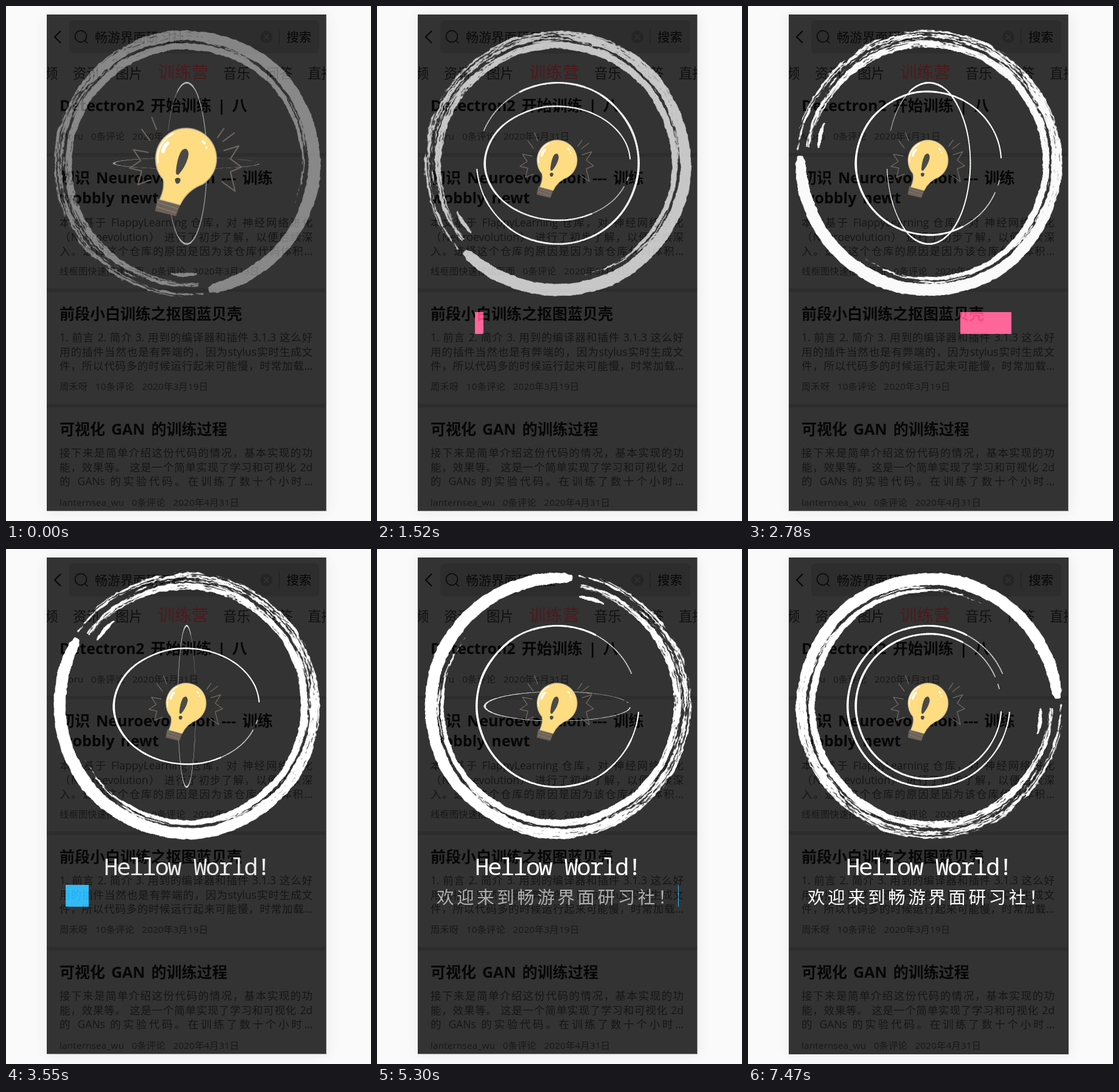
An HTML page with a canvas that plays this animation: 600 px wide and 848 px high, repeating every 8000 ms.

```html
<!DOCTYPE html>
<html lang="zh-CN">
<head>
<meta charset="utf-8">
<title>Intro</title>
<style>
html, body { margin: 0; width: 100%; height: 100%; overflow: hidden; background: #fafafa; }
body { position: relative; }
#card { position: absolute; left: 67px; top: 14px; width: 459px; height: 817px; overflow: hidden;
  background: #333; border: solid #969696; border-width: 0 1px 1px 0; box-shadow: 0 0 22px rgba(0,0,0,.07); }
#page { position: absolute; left: -67px; top: -14px; width: 600px; height: 848px;
  font-family: "Open Sans", "Noto Sans CJK SC", "Noto Sans CJK", sans-serif; }
#page div, #page svg { position: absolute; }
.t { white-space: nowrap; line-height: 30px; height: 30px; }
.title { font-weight: 700; word-spacing: 3.5px; }
.body { width: 416px; text-align: justify; text-align-last: justify; }
.meta { display: flex; gap: 12.5px; letter-spacing: .2px; }
.bar { left: 67px; width: 460px; height: 6px; background: #2d2d2d; }
#art { position: absolute; left: 0; top: 0; }
.line { position: absolute; height: 36px; color: #fff; white-space: nowrap; }
.line i { position: absolute; top: 0; height: 100%; mix-blend-mode: screen; }
.line span { display: block; opacity: 0; }
#hello { left: 161px; top: 504px; width: 272px; letter-spacing: -2.48px;
  font: 39px/36px "Noto Sans Mono", "Liberation Mono", monospace; }
#hello i { background: #ff4081; }
#welcome { left: 98px; top: 553px; width: 397px; letter-spacing: 4.58px;
  font: 500 28.5px/37px "Noto Sans CJK SC", "Noto Sans CJK", sans-serif; }
#welcome i { background: #03a9f4; }
</style>
</head>
<body>
<div id="card"><div id="page">
  <svg width="600" height="140" fill="none" stroke="#080808" stroke-width="2">
    <rect x="104" y="24" width="411" height="54" rx="6" fill="#2d2d2d" stroke="none"/>
    <path d="M90 41 80 51 90 61" stroke-width="2.2"/>
    <circle cx="123" cy="50" r="9.5" stroke-width="1.6"/>
    <path d="M129.500 57 134.500 61.500" stroke-width="1.6"/>
    <circle cx="428" cy="51" r="10" fill="#252525" stroke="none"/>
    <path d="M424 47l8 8m0-8l-8 8" stroke="#333" stroke-width="1.6"/>
    <path d="M449 38v26" stroke="#202020" stroke-width="1"/>
  </svg>
</div></div>
<canvas id="art" width="600" height="848"></canvas>
<div class="line" id="hello"><span>Hellow World!</span><i></i></div>
<div class="line" id="welcome"><span>欢迎来到畅游界面研习社！</span><i></i></div>

<script>
const $ = id => document.getElementById(id);
const card = $('card'), page = $('page'), g = $('art').getContext('2d');

// ---- page behind the veil ----
function put(text, x, base, size, color, cls = '') {
  const d = document.createElement('div');
  d.className = 't ' + cls;
  d.style.cssText = `left:${x}px;top:${base - .388 * size - 15}px;font-size:${size}px;color:${color}`;
  for (const part of [].concat(text)) {
    const s = document.createElement('span');
    s.textContent = part;
    d.append(s);
  }
  page.append(d);
}
function bar(y) {
  const d = document.createElement('div');
  d.className = 'bar';
  d.style.top = y + 'px';
  page.append(d);
}
const title = (s, y) => put(s, 88, y, 25, '#060606', 'title');
const body = (y, ...rows) => rows.forEach((s, i) => put(s, 88, y + i * 23.6, 17.5, '#161616', 'body'));
const meta = (y, ...parts) => put(parts, 88, y, 15.25, '#181818', 'meta');

put('畅游界面研习社', 146, 59, 21, '#0b0b0b');
put('搜索', 461, 59, 20.5, '#060606');
for (const [s, x] of [['频', 63], ['资讯', 110], ['图片', 180], ['音乐', 357], ['问答', 427], ['直播', 496]])
  put(s, x, 120, 22.2, '#101010');
put('训练营', 250, 120, 27.5, '#4c1a1d');

title('Detectron2 开始训练 | 八', 173);
meta(220, 'Moru', '0条评论', '2020年4月31日');
bar(242);
title('初识 Neuroevolution --- 训练', 292);
title('wobbly newt', 325);
body(363, '本文基于 FlappyLearning 仓库，对 神经网络进化',
  '（Neuroevolution） 进行了初步了解，以便后续深',
  '入。选择这个仓库的原因是因为该仓库代码体积…');
meta(442, '线框图快速搭建页面', '0条评论', '2020年3月13日');
bar(465);
title('前段小白训练之抠图蓝贝壳', 516);
body(552, '1. 前言 2. 简介 3. 用到的编译器和插件 3.1.3 这么好',
  '用的插件当然也是有弊端的，因为stylus实时生成文',
  '件，所以代码多的时候运行起来可能慢，时常加载…');
meta(632, '周禾呀', '10条评论', '2020年3月19日');
bar(655);
title('可视化 GAN 的训练过程', 706);
body(742, '接下来是简单介绍这份代码的情况，基本实现的功',
  '能，效果等。 这是一个简单实现了学习和可视化 2d',
  '的 GANs 的实验代码。在训练了数十个小时…');
meta(823, 'lanternsea_wu', '0条评论', '2020年4月31日');

// ---- helpers ----
const RAD = Math.PI / 180;
const clamp = v => Math.max(0, Math.min(1, v));
const mix = (a, b, k) => a + (b - a) * k;
function hash(x, y) {
  const v = Math.sin(x * 127.1 + y * 311.7) * 43758.5453;
  return v - Math.floor(v);
}
function noise(x, y) {
  const i = Math.floor(x), j = Math.floor(y), u = x - i, v = y - j;
  const a = u * u * (3 - 2 * u), b = v * v * (3 - 2 * v);
  return mix(mix(hash(i, j), hash(i + 1, j), a), mix(hash(i, j + 1), hash(i + 1, j + 1), a), b);
}
// cubic-bezier(.25, .1, .25, 1)
function ease(p) {
  p = clamp(p);
  if (p === 0 || p === 1) return p;
  const curve = (s, a, b) => 3 * (1 - s) ** 2 * s * a + 3 * (1 - s) * s * s * b + s ** 3;
  let lo = 0, hi = 1;
  for (let i = 0; i < 24; i++) {
    const m = (lo + hi) / 2;
    if (curve(m, .25, .25) < p) lo = m; else hi = m;
  }
  return curve(lo, .1, 1);
}

// ---- brush ring: bands of [angle, inner radius, outer radius, ink], clockwise from the head ----
const bands = [
  [[2, 214, 221, .6], [60, 207, 221, .55], [130, 203, 219, .72], [200, 201, 219, .98],
   [290, 198, 220, 1.15], [340, 200, 220, 1.2], [357, 203, 220, 1.25], [360.5, 208, 217, 1.25]],
  [[4, 196, 205, .75], [60, 190, 203, .75], [130, 187, 200, .98], [200, 186, 198, 1.05],
   [260, 187, 195, .95], [302, 188, 192, .4]],
  [[4.500, 182, 186, 1], [11, 180, 188, 1.2], [18.5, 182, 186, .8]],
  [[30, 194, 214, .38], [140, 190, 214, .5], [275, 190, 210, .46]]
];
function ink(band, a, r) {
  const end = band[band.length - 1];
  if (a < band[0][0] || a > end[0]) return 0;
  const i = Math.max(1, band.findIndex(k => k[0] >= a));
  const p = band[i - 1], q = band[i], k = (a - p[0]) / (q[0] - p[0]);
  const lo = mix(p[1], q[1], k), hi = mix(p[2], q[2], k);
  const along = clamp(Math.min(a - band[0][0], end[0] - a) * 1.5);
  return mix(p[3], q[3], k) * clamp((r - lo) / 2.5 + .3) * clamp((hi - r) / 2.5 + .3) * along;
}
function makeRing() {
  const size = 460, c = size / 2, cv = document.createElement('canvas');
  cv.width = cv.height = size;
  const x2 = cv.getContext('2d'), img = x2.createImageData(size, size);
  for (let y = 0; y < size; y++) for (let x = 0; x < size; x++) {
    const dx = x + .5 - c, dy = y + .5 - c, dist = Math.hypot(dx, dy);
    if (dist < 174 || dist > 228) continue;
    let a = Math.atan2(dx, -dy) / RAD;
    if (a < 1) a += 360;
    const r = dist + (noise(a * .06, 3) - .5) * 2 + (noise(a * .6, 8) - .5) * 1.5;
    const n = noise(a * .16, r * .62) * .65 + noise(a * .9, r * .8 + 50) * .35;
    const d = Math.max(...bands.map(b => ink(b, a, r)));
    const p = (y * size + x) * 4;
    img.data[p] = img.data[p + 1] = img.data[p + 2] = 255;
    img.data[p + 3] = 255 * clamp((d - n) * 6);
  }
  x2.putImageData(img, 0, 0);
  return cv;
}
const ring = makeRing();

// thin hand-drawn circle, broken at the upper right
function hoop(r, sx, sy, alpha) {
  g.save();
  g.translate(297, 259);
  g.scale(sx, sy);
  g.strokeStyle = '#fff';
  for (let a = 4; a < 352; a += 2) {
    const dry = a > 296;
    if (dry && noise(a * .16, r) < .34) continue;
    g.globalAlpha = alpha * (dry ? .7 : 1);
    g.lineWidth = dry ? 1.7 : 2 + 1.3 * Math.sin(a * RAD / 2) + noise(a * .15, r) - .5;
    g.beginPath();
    g.arc(0, 0, r - 1.5 + noise(a * .05, r + 9), a * RAD, (a + 2.3) * RAD);
    g.stroke();
  }
  g.restore();
}

const shape = (d, fill) => { g.fillStyle = fill; g.fill(new Path2D(d)); };
const stroke = (d, color, w) => { g.strokeStyle = color; g.lineWidth = w; g.stroke(new Path2D(d)); };
const GLASS = 'M263 254A33 33 0 1 1 314 281.500Q297 288 289.500 304L267.500 298Q273.500 285 271 276Q263 267 263 254Z';
function bulb(s) {
  g.save();
  g.translate(296, 258.5);
  g.scale(s, s);
  g.translate(-296, -258.5);
  g.lineCap = g.lineJoin = 'round';
  stroke('M255 247 239 244 247 256 235 264 248 267 244 282 257 277' +
    'M337 245 353 240 344 254 356 263 344 268 349 289 335 279' +
    'M248 222 257 234M259 209 264 222M330 231 337 221M336 235 348 226', '#6c655f', 1.4);
  shape('M265 297 289.500 304 285 316 262.500 310.500Z', '#6d6259');
  stroke('M265.500 301 286.500 308M264.500 306 285 312.500', '#86796d', 1);
  shape(GLASS, '#fddc82');
  stroke(GLASS, 'rgba(190,180,155,.7)', 1.2);
  stroke('M265.500 258A30.500 30.500 0 0 1 282 226.500', 'rgba(255,250,235,.9)', 2);
  stroke('M271 246Q272 240 276 237', '#fff', 4);
  stroke('M314 235 316 237M318 242h.1', '#fff', 2.5);
  shape('M290 247Q292 243 296 243Q300 246 298 253Q295 263 288 271Q285 272 285 268Q286 255 290 247Z', '#4c4a46');
  shape('M284 276Q287 273 290 276Q290 281 286 281Q284 280 284 276Z', '#4c4a46');
  g.restore();
}

// block grows from the left, leaves to the right, then its text fades in
const HALF = 942;
function reveal(el, t) {
  const grow = ease(t / HALF), leave = ease((t - HALF) / HALF);
  const bar = el.querySelector('i').style;
  bar.left = leave * 100 + '%';
  bar.width = (grow - leave) * 100 + '%';
  el.querySelector('span').style.opacity = ease((t - 1.6 * HALF) / HALF);
}

function draw(t) {
  card.style.borderColor = t < 7470 ? '#969696' : '#333';

  const fade = clamp(.42 + t * .0002);
  const turn = .037 * (t - 7470);
  g.clearRect(0, 0, 600, 848);
  g.save();
  g.globalAlpha = fade;
  g.translate(297.5, 258.5);
  g.rotate((86.5 + turn) * RAD);
  g.drawImage(ring, -230, -230);
  g.restore();

  const spin = Math.min(180, -75.5 + t * .0484);
  const soft = clamp(.62 + t * .0002);
  hoop(134, -Math.cos(spin * RAD), 1, soft);
  hoop(120.5, 1, -Math.cos((182 + turn) * RAD), soft);
  bulb(mix(1.52, 1, 1 - (1 - clamp(t / 900)) ** 2));

  reveal($('hello'), t - 1456);
  reveal($('welcome'), t - 3456);
}

// the picture advances every 70 ms, with a longer first and last hold
const start = performance.now();
function tick(now) {
  const t = Math.max(0, now - start) % 8000;
  draw(t < 120 ? 0 : Math.min(7470, 120 + Math.floor((t - 120) / 70) * 70));
  requestAnimationFrame(tick);
}
draw(0);
requestAnimationFrame(tick);
</script>
</body>
</html>
```
